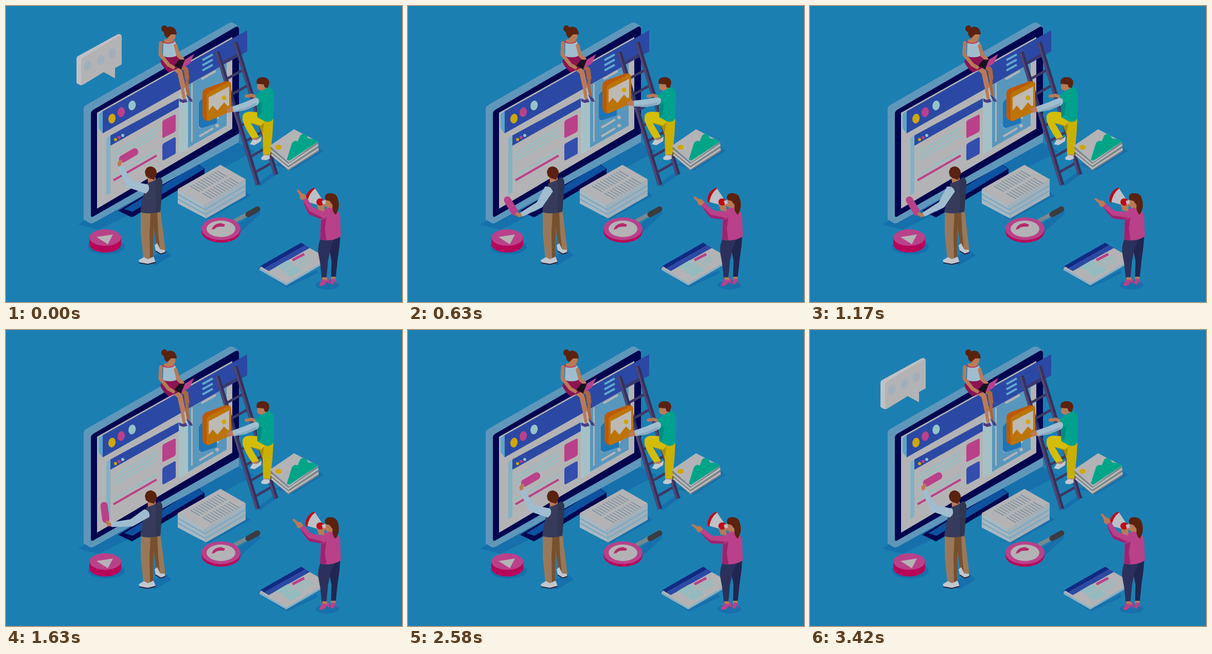
An HTML page that plays this animation: 770 by 574 pixels, repeating every 8000 ms.

```html
<!DOCTYPE html>
<html lang="en">
<head>
<meta charset="utf-8">
<title>Building a web page</title>
<style>
html, body { margin: 0; width: 100%; height: 100%; overflow: hidden; background: #1c7fb2; }
svg { display: block; width: 770px; height: 574px; }
.shade { fill: #1670ab; }
.white { fill: #b3b3b5; }
.navy { fill: #02064f; }
.blue { fill: #2b49a4; }
.steel { fill: #5f97bb; }
.cyan { fill: #94c3c9; }
.pink { fill: #b9418a; }
.crimson { fill: #b70659; }
.gold { fill: #cfa60c; }
.skin { fill: #b97a57; }
.hair { fill: #5a220f; }
.cloth { fill: #a0bdcf; }
.line { fill: none; stroke-linecap: butt; }
.round { fill: none; stroke-linecap: round; stroke-linejoin: round; }
</style>
</head>
<body>
<svg viewBox="0 0 770 574">
  <!-- floor shadows -->
  <g class="shade">
    <path d="M140 424L300 330 450 265 484 282 360 345 180 434Z"/>
    <path d="M452 366L466 360 476 368 392 414 376 408Z"/>
    <path d="M522 308L606 272 618 281 556 319Z"/>
    <path d="M262 494L312 474 322 484 290 503Z"/>
    <path d="M488 508L500 502 552 538 604 512 606 518 546 546Z"/>
    <ellipse cx="625" cy="541" rx="23" ry="9"/>
    <ellipse cx="195" cy="467" rx="36" ry="15"/>
    <path d="M384 445Q420 472 454 440L496 402 490 396 440 430Z"/>
    <path d="M486 346L494 350 520 331 532 323 524 319Z"/>
  </g>

  <g id="bubble">
    <path fill="#c0c1c4" d="M137 103Q137 98 142 96L215 56Q223 52 225 59V113L212 120V140L190 128 148 153Q145 155 137 149Z"/>
    <path class="white" d="M146 108Q146 102 151 99L217 59Q225 55 225 62V113L212 120V140L190 128 151 152Q146 154 146 149Z"/>
    <g fill="#a2afbb">
      <ellipse cx="159" cy="116" rx="7" ry="10" transform="rotate(20 159 116)"/>
      <ellipse cx="184" cy="105" rx="7" ry="10" transform="rotate(20 184 105)"/>
      <ellipse cx="207" cy="92" rx="7" ry="10" transform="rotate(20 207 92)"/>
    </g>
  </g>

  <!-- stand -->
  <path class="navy" d="M218 397L372 306 386 316V326L245 410Z"/>
  <path fill="#0d52a0" d="M230 394L372 307 385 316 246 399Z"/>

  <!-- monitor -->
  <path class="steel" d="M151 200Q151 195 156 192L432 34Q438 30 444 34L453 40V264L171 420Q165 423 161 420L151 414Z"/>
  <path class="navy" d="M165 209Q165 204 170 201L444 42Q453 36 453 46V247L170 408Q165 411 165 405Z"/>
  <path class="white" d="M177 207L440 60V238L177 393Z"/>
  <path fill="#a6c1c6" d="M336 173L355 163V277L336 288Z"/>
  <path fill="#5897bd" d="M354 154L429 111V232L354 275Z"/>
  <path class="white" d="M360 152L363 150V262L360 264Z"/>
  <path class="line" stroke="#b3b3b5" stroke-width="4" d="M380 142L408 126M376 236L403 220M376 253L403 237"/>
  <circle class="white" cx="410.500" cy="216" r="3.500"/>
  <circle class="white" cx="410.500" cy="232" r="3.500"/>
  <path fill="#5ba5ca" d="M180 209L188 204V247L180 237Z"/>
  <path class="blue" d="M188 204L469 47V88L188 247Z"/>
  <path class="line" stroke="#5eabcf" stroke-width="4" d="M382 105L402 94M382 115L402 104M382 125L402 114"/>
  <g transform="rotate(12 225 206)">
    <ellipse class="gold" cx="209" cy="222" rx="7" ry="9.500"/>
    <ellipse class="pink" cx="224" cy="206" rx="7" ry="9.500"/>
    <ellipse class="cyan" cx="242" cy="189" rx="7" ry="9.500"/>
  </g>

  <!-- window on the screen -->
  <path fill="#80b2c4" d="M195 256L203 251V362L195 367Z"/>
  <path class="white" d="M203 251L336 180V280L203 362Z"/>
  <path class="blue" d="M203 251L336 179V196L203 271Z"/>
  <circle class="gold" cx="213" cy="259" r="3"/>
  <circle class="pink" cx="220" cy="255" r="3"/>
  <circle class="cyan" cx="227" cy="251" r="3"/>
  <path class="line" stroke="#8fbfc3" stroke-width="2.500" d="M209 284L293 236M209 292L293 244M209 300L293 252M209 328L293 280"/>
  <path class="line" stroke="#b9418a" stroke-width="4" d="M209 338L293 290"/>
  <path class="pink" d="M304 226Q304 223 307 221L327 211Q330 210 330 213V240Q330 243 327 245L307 255Q304 257 304 254Z"/>
  <path fill="#344ead" d="M304 272Q304 268 307 266L327 255Q330 254 330 257V284Q330 287 327 288L307 299Q304 300 304 297Z"/>

  <!-- seated woman -->
  <path class="round" stroke="#b97a57" stroke-width="10" d="M323 116L338 128 344 155"/>
  <path class="round" stroke="#b97a57" stroke-width="6" d="M341 140L343 160 346 178"/>
  <path class="round" stroke="#a96743" stroke-width="9" d="M336 114L350 123 352 140"/>
  <path class="round" stroke="#a96743" stroke-width="6" d="M352 130L352 158 355 174"/>
  <path fill="#4a3d83" d="M337 179L343 182 350 180 353 186 344 188 337 185ZM350 172L355 175 361 180 363 186 357 185Z"/>
  <path fill="#8b1453" d="M304 97L331 94 344 105 349 115 332 122 317 129Q305 120 300 108Z"/>
  <path class="skin" d="M307 65L322 63 331 71 328 79 308 78Z"/>
  <path class="cloth" d="M306 70Q315 76 328 69L334 80 331 97Q318 102 305 97Z"/>
  <path class="round" stroke="#b97a57" stroke-width="7" d="M301 72L300 94 316 114 325 119M330 77L335 96 343 103"/>
  <path fill="#c03553" d="M304 67Q315 76 328 67L326 71Q313 76 304 70Z"/>
  <path fill="#161320" d="M327 116L337 104 348 104 341 123Z"/>
  <path class="pink" d="M341 121L348 104 366 93 357 112Z"/>
  <ellipse class="skin" cx="321" cy="59" rx="8.500" ry="9"/>
  <path class="hair" d="M307 52Q308 42 318 40 331 40 332 55L321 55 314 62Q308 60 307 52Z"/>
  <ellipse class="hair" cx="308" cy="44" rx="6" ry="6.500"/>

  <!-- ladder -->
  <g class="line">
    <path id="rungs" stroke="#3c3866" stroke-width="5"/>
    <path stroke="#34315d" stroke-width="9" d="M411 89L490 347M446 70L525 327"/>
    <path stroke="#504776" stroke-width="4" d="M409 90L488 348M444 71L523 328"/>
  </g>

  <g id="icon">
    <path fill="#1f74b5" d="M375 190Q375 185 382 180L410 168V227L383 236Q375 238 375 230Z"/>
    <path fill="#bd5904" d="M382 170Q382 164 388 160L426 146Q432 144 437 149V202L392 223Q386 223 382 215Z"/>
    <path fill="#bc7408" d="M390 175Q390 169 396 166L430 149Q438 146 438 153V198Q438 203 433 206L397 222Q390 225 390 218Z"/>
    <path fill="#bdb9b5" d="M394 177L434 156V193L394 214Z"/>
    <path fill="#bc7408" d="M394 214V203L402 193 411 203 424 187 434 197 434 193 394 216Z"/>
    <circle class="gold" cx="424" cy="178" r="4.500"/>
  </g>

  <!-- climber -->
  <path class="round" stroke="#b97a57" stroke-width="6" d="M488 178L478 173 467 175"/>
  <path fill="#c9b000" d="M489 206L520 218 518 250 514 290Q507 294 500 289L499 249 490 224Z"/>
  <path fill="#d3bd08" d="M460 213Q463 205 474 205L490 206 505 222 496 232 476 227 492 254 480 259Q466 240 460 222Z"/>
  <path fill="#a99000" d="M476 227L496 232 502 226 499 246 492 233Z"/>
  <path class="skin" d="M479 257L490 254 491 260 480 263ZM500 288L513 288 512 293 500 293Z"/>
  <path fill="#c3c9cf" d="M474 268L480 259 488 260 497 253 496 262 483 270ZM496 294L502 289 512 290 513 296 505 299 497 298Z"/>
  <path class="skin" d="M489 151L506 148 508 167 497 169 496 164Q489 163 488 158Z"/>
  <path fill="#00a28d" d="M486 173L497 164 512 157Q520 159 521 172L520 218Q515 227 504 224L489 216Z"/>
  <path fill="#008c83" d="M488 190L498 187 495 211 489 216Z"/>
  <path class="hair" d="M487 148Q487 138 499 138 511 138 512 149L509 159 503 158 501 152 488 151Z"/>
  <g id="reach">
    <path class="skin" d="M428 201L436 195 444 197 443 205 433 207Z"/>
    <path class="cloth" d="M440 195L463 187 482 179Q491 176 492 184 492 192 484 194L465 202 443 206Z"/>
    <path fill="#8aaac1" d="M442 204L465 197 488 187 485 194 465 202 443 206Z"/>
  </g>

  <!-- picture stack -->
  <path fill="#7f8487" d="M514 271L549 304V319L516 290ZM549 304L607 263 608 282 549 319Z"/>
  <path class="line" stroke="#bbbdbf" stroke-width="3" d="M515 280L549 308 607 269M516 288L549 315 608 277"/>
  <path class="white" d="M513 271L560 239 607 263 550 304Z"/>
  <path fill="#00a588" d="M546 298L556 266Q562 259 567 263L572 251Q580 243 588 257 598 256 607 263L551 300Z"/>
  <ellipse class="gold" cx="530" cy="274" rx="6" ry="5"/>

  <!-- paper stack -->
  <path fill="#aab8c0" d="M334 355L385 385 389 412 334 383Z"/>
  <path fill="#a2b0b9" d="M385 385L466 336V368L389 412Z"/>
  <path class="line" stroke="#7fa9c3" stroke-width="3" d="M334 365L387 395 466 348M334 374L388 404 466 358"/>
  <path class="white" d="M334 355L417 308 466 336 385 386Z"/>
  <path id="print" class="line" stroke="#778f9f" stroke-width="1.500"/>

  <!-- magnifier -->
  <path class="line" stroke="#78888f" stroke-width="8" d="M444 417L471 403"/>
  <path class="round" stroke="#3b3b40" stroke-width="11" d="M471 404L489 394"/>
  <ellipse class="crimson" cx="418" cy="437" rx="38" ry="22"/>
  <ellipse class="pink" cx="418" cy="432" rx="38" ry="22"/>
  <ellipse class="white" cx="418" cy="432" rx="28" ry="16"/>
  <path class="crimson" fill-opacity=".8" d="M400 434Q403 422 418 421L426 424 424 428Q410 427 406 432Z"/>

  <!-- play button -->
  <path class="crimson" d="M162 449V462A31 16 0 0 0 224 462V449Z"/>
  <ellipse class="pink" cx="193" cy="449" rx="31" ry="16"/>
  <path class="white" d="M176 448L208 443 198 462Z"/>

  <!-- sheet on the floor -->
  <path fill="#8ab0c6" d="M493 508L545 537 627 490V494L545 542 493 512Z"/>
  <path class="white" d="M493 508L574 460 627 490 545 538Z"/>
  <path fill="#102a83" d="M495 504L574 459 582 464 502 509Z"/>
  <path class="blue" d="M502 509L582 464 591 469 511 514Z"/>
  <path fill="#94bcc0" d="M525 506L547 493 560 501 538 513ZM538 515L562 502 577 512 554 525Z"/>
  <path class="line" stroke="#b9418a" stroke-width="5" d="M557 493L580 481"/>
  <path class="line" stroke="#94bcc0" stroke-width="2.500" d="M564 496L588 485M567 501L593 488M571 506L595 492"/>

  <!-- standing man -->
  <path fill="#99785a" d="M262 398L300 394 304 425 310 474Q303 481 294 477L287 432 286 490Q277 496 267 490L262 440Z"/>
  <path fill="#775030" d="M281 400L294 397 296 440 300 478 294 477 287 428 286 490 280 492 279 440Z"/>
  <path fill="#c2c6cd" d="M258 493L268 487 276 491 287 486 291 497 276 501 260 498ZM289 464L294 460 300 472 309 473 309 479 301 481 291 474Z"/>
  <path class="line" stroke="#28213f" stroke-width="2" d="M259 498L276 501 291 497M291 475L301 481 310 478"/>
  <path class="skin" d="M275 329L290 330 293 343 276 344Z"/>
  <path fill="#373b5b" d="M273 344L287 339 298 332Q305 335 304 348L300 399Q281 405 261 400L265 375Z"/>
  <path fill="#303551" d="M291 338L298 332Q305 335 304 348L300 399 291 401Z"/>
  <path class="hair" d="M270 322Q272 311 282 311 294 314 293 326L288 337 278 334 272 330Z"/>
  <g id="upper">
    <path class="cloth" d="M0 -9Q-8 0 0 9L35 7A7 7 0 0 0 35 -7Z"/>
    <g id="fore">
      <path class="round" stroke="#b9418a" stroke-width="14" d="M49.500 11L50.500 38"/>
      <path class="round" stroke="#b97a57" stroke-width="7" d="M39 0L45 1 47 5"/>
      <path class="cloth" d="M0 -7A7 7 0 0 0 0 7L40 4.500V-4.500Z"/>
    </g>
  </g>

  <!-- woman with the megaphone -->
  <path fill="#20264f" d="M624 452L650 445Q649 468 645 490L641 528H632L633 494 628 470Z"/>
  <path fill="#2b315c" d="M612 450L640 449 631 470 626 496 623 528H614L611 500 607 478Q606 464 612 450Z"/>
  <path class="skin" d="M615 526H624L625 532 615 533ZM632 525H641V531L632 532Z"/>
  <path class="pink" d="M609 540L615 530 625 532 629 526 628 540 625 534 618 542 610 543ZM630 537L633 529 641 529 643 540 640 534 635 541Z"/>
  <path class="skin" d="M621 372L632 372 636 386 636 396 624 396 624 390 618 387Z"/>
  <path class="pink" d="M612 403Q617 392 630 391L641 395Q651 400 650 414L651 447Q633 458 611 453Z"/>
  <path fill="#9e226f" d="M613 406L623 410 620 432 623 454 611 453Z"/>
  <path class="skin" d="M604 385L612 382 619 385 619 398 608 397Z"/>
  <path fill="#c00a16" d="M582 379Q582 360 599 352 603 354 599 362 593 374 586 382Z"/>
  <path fill="#bcc0c7" d="M586 380Q589 363 601 354L615 375 608 386Z"/>
  <ellipse fill="#c00a16" cx="611" cy="380" rx="7.500" ry="7"/>
  <path fill="#bcc0c7" d="M614 378L621 376 622 383 616 385Z"/>
  <path class="hair" d="M620 371Q621 362 632 363 643 364 645 373 651 390 641 405 633 398 635 386L629 378 621 376Z"/>
  <g id="point">
    <path class="skin" d="M565 357L569 356 575 363 581 365 585 373 580 378 572 374 571 367Z"/>
    <path class="pink" d="M577 376L585 372 597 391 618 399Q625 404 621 411 617 416 609 411L591 405Q585 401 577 376Z"/>
    <path fill="#9e226f" d="M577 376L590 398 613 409 619 412 609 412 591 405Q585 400 577 376Z"/>
  </g>
</svg>
<script>
const LOOP = 8000, RESTART = 40;
const $ = id => document.getElementById(id);
const range = n => [...Array(n).keys()];
const mix = (a, b, u) => a + (b - a) * u;

// Eased progress of a step that runs from time a to time b
function step(t, a, b) {
  const u = Math.min(1, Math.max(0, (t - a) / (b - a)));
  return u * u * (3 - 2 * u);
}

// Value at time t on straight lines through [time, value] keys
function track(t, keys) {
  const i = keys.findIndex(k => k[0] > t);
  if (i < 0) return keys[keys.length - 1][1];
  const [t0, v0] = keys[i - 1], [t1, v1] = keys[i];
  return mix(v0, v1, (t - t0) / (t1 - t0));
}

$('rungs').setAttribute('d', range(8).map(i => {
  const s = 0.09 + 0.117 * i;
  return `M${411 + 79 * s} ${89 + 258 * s}L${446 + 79 * s} ${70 + 257 * s}`;
}).join(''));

$('print').setAttribute('d', range(11).map(i => {
  const x = 358 + 5.2 * i, y = 349 - 2.95 * i;
  return `M${x} ${y}l19 11m5 3l19 11`;
}).join(''));

const swing = [[0, 0], [630, -14], [950, -20], [1170, -17], [1630, -11], [1960, 0],
  [2690, -24], [3420, 0]];

// The page is taken apart at RESTART, then icon, button and bubble are placed in turn
function draw(now) {
  const t = now % LOOP;
  const built = t < RESTART;
  const away = built ? 0 : 1 - step(t, 840, 1160);
  const press = built ? 1 : step(t, 1450, 1900);
  const upper = mix(121, 195.7, press);
  const fore = mix(151, 242, press ** 1.3);
  const set = (id, value) => $(id).setAttribute('transform', value);
  set('upper', `translate(274 355) rotate(${upper})`);
  set('fore', `translate(35 0) rotate(${fore - upper})`);
  set('icon', `translate(${-4 * away} ${-15 * away})`);
  set('reach', `rotate(${13 * away} 490 184)`);
  set('point', `rotate(${track(t, swing)} 617 408)`);
  $('bubble').style.opacity = built ? 1 : step(t, 2650, 3000);
  requestAnimationFrame(draw);
}
draw(0);
</script>
</body>
</html>
```
